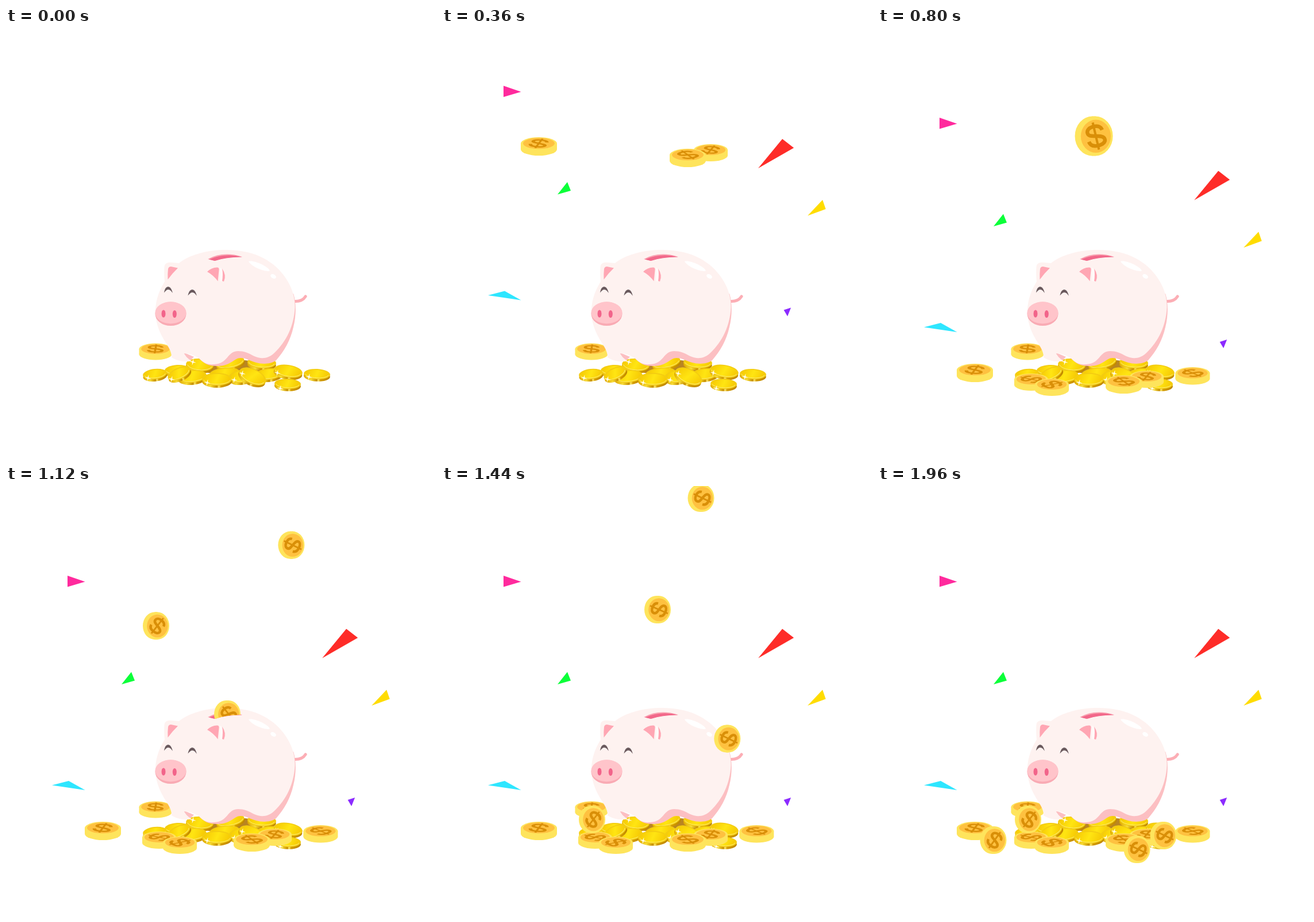
These frames come from a looping animation (748x748 px, 2040 ms). An HTML page with a canvas:

```html
<!DOCTYPE html>
<html lang="en">
<head>
<meta charset="utf-8">
<title>Piggy bank</title>
<style>
html, body { margin: 0; width: 100%; height: 100%; overflow: hidden; background: #fff; }
canvas { display: block; width: 748px; height: 748px; }
</style>
</head>
<body>
<canvas id="stage" width="748" height="748"></canvas>
<script>
const SIZE = 748, LOOP = 2040, STEP = 40;
const ctx = document.getElementById('stage').getContext('2d');
const C = {
  rim: '#fee45c', face: '#fec140', sign: '#d98f08',
  skin: '#fef2f0', shade: '#fcbfc2', ear: '#ffa6b3', deep: '#f2688a'
};

function fill(path, color) {
  ctx.fillStyle = color;
  ctx.fill(typeof path === 'string' ? new Path2D(path) : path);
}
function oval(x, y, rx, ry, color, rot = 0) {
  ctx.fillStyle = color;
  ctx.beginPath();
  ctx.ellipse(x, y, rx, ry, rot, 0, Math.PI * 2);
  ctx.fill();
}
function at(x, y, deg, sx, sy, draw) {
  ctx.save();
  ctx.translate(x, y);
  ctx.scale(sx, sy);
  ctx.rotate(deg * Math.PI / 180);
  draw();
  ctx.restore();
}

// ---- Dollar coins ----
const S_CURVE = new Path2D('M13 -8C12 -14 7 -17 0 -17C-8 -17 -13 -13.5 -13 -8.5C-13 -2 -6 -1.5 0 0C6 1.5 14 3 14 9C14 14 8 17 0 17C-8 17 -13 14 -14 7');
const BAR = new Path2D('M0 -24V24');

function dollar() {
  ctx.strokeStyle = C.sign;
  ctx.lineWidth = 6.4;
  ctx.stroke(S_CURVE);
  ctx.lineWidth = 4;
  ctx.stroke(BAR);
}

// Coin lying flat; y is its top edge
function flatCoin(x, y, w, deg) {
  const k = w / 63;
  at(x, y, 0, k, k, () => {
    oval(0, 21, 31.5, 11, C.rim);
    ctx.fillRect(-31.5, 11, 63, 10);
    oval(0, 11, 31.5, 11, C.rim);
    oval(0, 10.7, 27.5, 9.6, C.face);
    at(0, 10.7, deg, 0.95, 0.35, dollar);
  });
}

// Coin standing up; (x, y) is its centre
function upCoin(x, y, deg, k = 1) {
  at(x, y, 0, k, k, () => {
    oval(-2, 0, 21, 24, C.rim);
    ctx.fillRect(-2, -24, 4, 48);
    oval(2, 0, 21, 24, C.rim);
    oval(2.4, 0.2, 18.2, 20, C.face);
    at(2.4, 0, deg, 0.7, 0.7, dollar);
  });
}

// ---- Pile of gold ----
const PILE = [
  [445, 582, 25, 10, 3], [390, 582, 25, 10, -12], [337, 586, 24, 11, 4],
  [380, 600, 26, 9, -6], [298, 595, 22, 9, -3], [324, 606, 25, 11, -6],
  [409, 606, 22, 11, -8], [457, 602, 24, 10, -6], [491, 597, 25, 11, 9],
  [259, 602, 21, 9, -6], [301, 601, 21, 10, -24], [367, 611, 26, 11, 0],
  [429, 606, 25, 13, 24], [490, 619, 23, 9, 2], [541, 602, 23, 9, 3]
];
const STARS = [
  [247, 609], [288, 611], [325, 581], [350, 617], [397, 612],
  [411, 601], [472, 600], [477, 627], [527, 607]
];

function goldCoin(x, y, rx, ry, deg) {
  at(x, y, deg, 1, 1, () => {
    const edge = ctx.createLinearGradient(-rx, 0, rx, 0);
    edge.addColorStop(0, '#dba300');
    edge.addColorStop(0.28, '#f8dc36');
    edge.addColorStop(0.5, '#c58c00');
    edge.addColorStop(0.56, '#ffe96a');
    edge.addColorStop(0.64, '#d29a00');
    edge.addColorStop(1, '#bd8500');
    oval(0, 3.8, rx, ry, edge);
    oval(0, 0, rx, ry, '#f3cc11');
    const face = ctx.createLinearGradient(-rx, -ry, rx, ry);
    face.addColorStop(0, '#f4c300');
    face.addColorStop(0.5, '#ffe512');
    face.addColorStop(1, '#f3c000');
    oval(0, -0.3, rx - 3, ry - 2, face);
    ctx.strokeStyle = '#fff07a';
    ctx.lineWidth = 0.9;
    ctx.beginPath();
    ctx.ellipse(0, -0.3, rx - 2.6, ry - 1.8, 0, 0.2, 3);
    ctx.stroke();
  });
}

function pile() {
  oval(392, 590, 62, 13, '#b98522');
  PILE.forEach(c => goldCoin(...c));
  for (const [x, y] of STARS) {
    at(x, y, 12, 1, 1, () => {
      fill('M0 -6L1 -1L6 0L1 1L0 6L-1 1L-6 0L-1 -1Z', '#fffdf0');
    });
  }
}

// ---- Pig ----
function pig() {
  ctx.strokeStyle = '#fcaeb5';
  ctx.lineWidth = 5;
  ctx.lineCap = 'round';
  ctx.stroke(new Path2D('M501 475.5C512 476 518 472 521 467'));
  ctx.lineCap = 'butt';

  // shaded lower and right side
  fill('M500 462C505 478 505 500 500 520C495 543 484 562 470 578C461 585 446 585 435 582C424 579 418 574 408 574C396 574 392 588 368 588C352 588 344 584 334 573L400 520Z', C.shade);
  fill('M308 564L327 572L319 580Z', C.shade);

  fill('M276 441C275 430 275 422 275.5 415C276 409 282 407 289 408L301 409C320 394 350 386 383 386C428 386 462 402 483 430C498 450 503 469 502.5 486C501 518 488 545 467 565C456 576 443 576 432 571C421 565 414 562 404 562C384 562 387 584 362 585C347 586 343 581 335 574C327 569 318 566 309 566C312 571 317 576 323 579C311 582 297 579 288 573C288 566 286 560 279 549C265 528 259 509 260 489C261 471 267 456 276 441Z', C.skin);

  // ears
  fill('M282 419Q283 415 287 415L299 417.5Q289 427 281.5 437.5Q281 427 282 419Z', C.ear);
  fill('M350 424Q358 416 368 416.5Q371 417 370.5 421L368.5 440.5Q361 430 350 424Z', C.ear);
  fill('M372 417Q376 418 377 423L376 441L372 440Z', '#fffaf9');
  fill('M376 418.5Q384 430 379 441L376 440Q378 429 376 418.5Z', C.ear);

  // slot
  fill('M351 402Q378 387.5 411 398Q385 397 364 405Z', '#f9a4b2');
  fill('M353 402.5Q382 390.5 411 398.5Q385 398 363 405Z', C.deep);

  // gloss
  fill('M422 406C430 403 455 414 459 422C456 426 428 417 422 406Z', '#fff');
  oval(465, 432, 5.2, 3.5, '#fff', 0.5);

  // eyes
  fill('M275 460.5C277 446.5 287 446.5 289.8 461C285 453 280 453 275 460.5Z', '#6a5a5e');
  fill('M316.5 465.5C319 451.5 329 451.5 331.8 466C327 458 322 458 316.5 465.5Z', '#6a5a5e');

  // snout
  oval(286.5, 497.2, 27, 20.8, '#f9abb4');
  oval(286.5, 495.2, 27, 19, '#ffc4ca');
  oval(274, 497, 3.5, 6.6, '#f2648a');
  oval(293.3, 497.5, 3.5, 6.6, '#f2648a');
}

// ---- Moving parts ----
const CONFETTI = [
  ['#ff2a9d', 'M107 156L137.5 166.5L107 175.5Z'],
  ['#fe2c28', 'M592 248.5L612 264L550 299.5Z'],
  ['#0bff39', 'M218 323.5L224 338.5L201 345Z'],
  ['#ffdc00', 'M662 354.5L667.5 370.5L636 382Z'],
  ['#2ee6ff', 'M80 520.5L109 513L137.5 529Z'],
  ['#8c2bff', 'M594.5 546L607 542L601 557Z']
];
// x, resting top, width, turn, landing time, speed per step
const FLAT = [
  [168.5, 584, 63, 16, 600, 65.67],
  [467.5, 596, 59, 18, 600, 65.67],
  [427.5, 604, 63, -28, 600, 65.67],
  [266.5, 601, 59, -60, 800, 64],
  [302.5, 610, 59, 60, 800, 64],
  [547.3, 590, 60, -42, 800, 64]
];
// x, resting centre, turn, landing time, speed per step
const UPRIGHT = [
  [261, 580, 38, 1440, 42.1],
  [496.3, 608, -64, 1600, 42.1],
  [450.5, 632, -64, 1960, 47],
  [200.5, 616, 36, 1960, 55]
];

// Distance still to fall
const above = (t, land, speed) => Math.max(0, (land - t) / STEP) * speed;

function slotCoins(t) {
  ctx.save();
  ctx.clip(new Path2D('M0 0H748V398H411Q385 397 364 405H0Z'));
  if (t > 600 && t < 1240) {
    const p = Math.max(0, (t - 800) / 320), q = Math.min(1, p);
    const y = t < 800 ? 188 - above(t, 800, 48) : 188 + 209 * p;
    upCoin(375.5 + 9.5 * q, y, -13 - 25 * q, 1.435 - 0.435 * q);
  }
  if (t > 1120 && t < 1680) upCoin(375, 215 + (t - 1440) / STEP * 42.1, -66);
  ctx.restore();
}

function draw(t) {
  ctx.fillStyle = '#fff';
  ctx.fillRect(0, 0, SIZE, SIZE);

  if (t > 0) {
    ctx.save();
    ctx.translate(0, -above(t, 400, 55.6));
    CONFETTI.forEach(([color, d]) => fill(d, color));
    ctx.restore();
  }

  flatCoin(260, 548.5, 57, 4);
  pile();
  pig();
  slotCoins(t);
  for (const [x, y, w, deg, land, v] of FLAT) flatCoin(x, y - above(t, land, v), w, deg);
  for (const [x, y, deg, land, v] of UPRIGHT) upCoin(x, y - above(t, land, v), deg);
}

const start = performance.now();
function tick() {
  const t = (performance.now() - start) % LOOP;
  draw(Math.min(1960, Math.floor(t / STEP) * STEP));
  requestAnimationFrame(tick);
}
tick();
</script>
</body>
</html>
```
